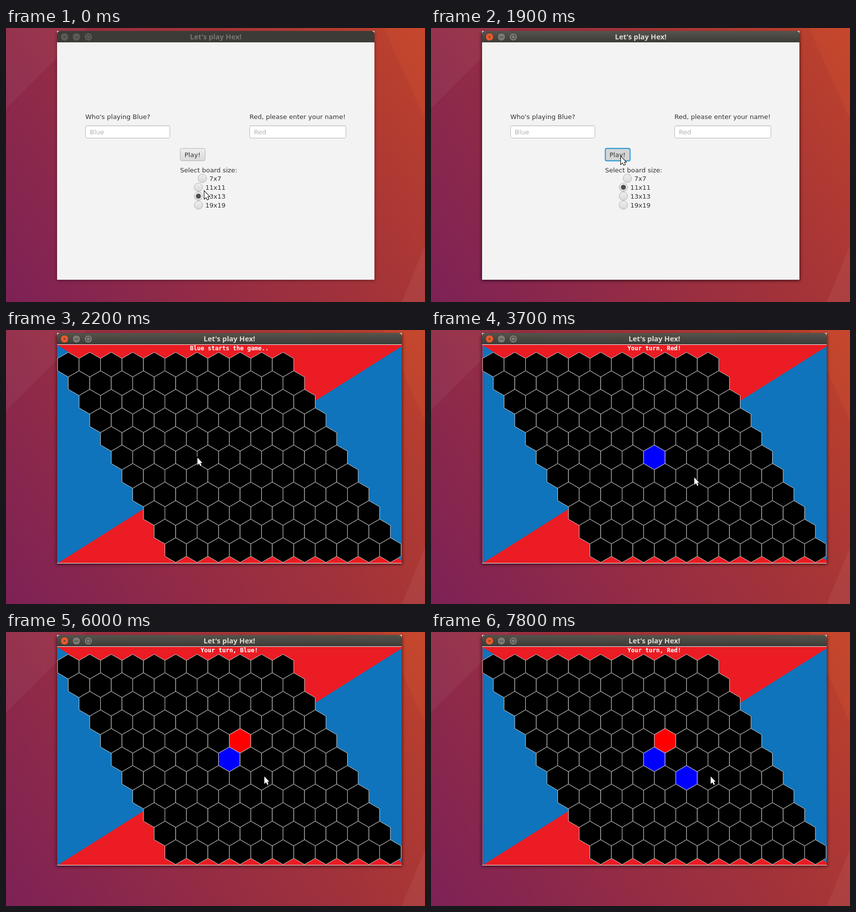
These frames come from a looping animation (845x554 px, 8 s). An HTML page:

```html
<!DOCTYPE html>
<html lang="en">
<head>
<meta charset="utf-8">
<title>Hex</title>
<style>
  html, body { margin: 0; width: 100%; height: 100%; overflow: hidden; }
  svg { display: block; width: 845px; height: 554px; }
  text { white-space: pre; }
  #menu text { font: 13px "DejaVu Sans", sans-serif; fill: #333; }
  #menu .hint { fill: #b0b0b0; }
  #title { font: bold 14.5px "Noto Sans", "Open Sans", sans-serif; text-anchor: middle; }
  #status { font: bold 12px "DejaVu Sans Mono", monospace; fill: #fff; text-anchor: middle; }
  #shadow { filter: blur(3px); }
</style>
</head>
<body>
<svg viewBox="0 0 845 554">
  <defs>
    <linearGradient id="wall" gradientUnits="userSpaceOnUse" x1="0" y1="554" x2="845" y2="0">
      <stop offset="0" stop-color="#7d2156"/>
      <stop offset=".36" stop-color="#942c44"/>
      <stop offset=".65" stop-color="#a53438"/>
      <stop offset="1" stop-color="#bf432b"/>
    </linearGradient>
    <linearGradient id="bar" x2="0" y2="1">
      <stop offset="0" stop-color="#56544c"/>
      <stop offset="1" stop-color="#3c3b37"/>
    </linearGradient>
    <linearGradient id="face" x2="0" y2="1">
      <stop offset="0" stop-color="#efefef"/>
      <stop offset="1" stop-color="#d9d9d9"/>
    </linearGradient>
    <linearGradient id="faceHover" x2="0" y2="1">
      <stop offset="0" stop-color="#f8f8f8"/>
      <stop offset="1" stop-color="#e6e6e6"/>
    </linearGradient>
    <linearGradient id="field" x2="0" y2="1">
      <stop offset="0" stop-color="#ececec"/>
      <stop offset=".14" stop-color="#fff"/>
    </linearGradient>
  </defs>

  <rect width="845" height="554" fill="url(#wall)"/>
  <path d="M0 0H163L0 163Z" fill="#fff" opacity=".045"/>
  <path d="M762 0H845V185Z" fill="#ff7030" opacity=".1"/>
  <path d="M845 440V554H798Z" fill="#fff" opacity=".05"/>

  <rect id="shadow" x="102" y="9"/>
  <rect id="body" x="103" y="6" fill="#f3f3f3"/>
  <path id="barShape"/>
  <g id="buttons" stroke="#3a3833"></g>
  <text id="title" y="23">Let's play Hex!</text>

  <g id="menu">
    <rect id="strip" x="743" y="29" width="55" height="443" fill="#f2f1ef"/>
    <text x="160" y="184">Who's playing Blue?</text>
    <text x="491" y="184">Red, please enter your name!</text>
    <g fill="url(#field)" stroke="#b9b9b9">
      <rect x="160.5" y="197.5" width="170" height="25" rx="3"/>
      <rect x="491.5" y="197.5" width="194" height="25" rx="3"/>
    </g>
    <text class="hint" x="169" y="215">Blue</text>
    <text class="hint" x="500" y="215">Red</text>
    <rect id="play" x="351.5" y="243.5" width="50" height="25" rx="3"/>
    <text x="360" y="261">Play!</text>
    <text x="351" y="292">Select board size:</text>
    <g id="radios"></g>
  </g>

  <g id="board">
    <path d="M103 29H798V472H103Z" fill="#eb1c23"/>
    <path d="M104 30.5L450 250V252.9L105 471H104ZM798 33L450 252.9V248L798 466Z" fill="#0f74bb"/>
    <path d="M103 29.5H798M103 471.5H798" stroke="#f0f0f0"/>
    <g id="cells" stroke="#d0d0d0"></g>
    <text id="status" x="450.4" y="41"></text>
  </g>

  <path id="cursor" d="M0 0V15L3.5 12L6 17L8.4 16L6.1 10.8H10Z"
        fill="#fff" stroke="#000" stroke-width="2" paint-order="stroke"/>
</svg>
<script>
const $ = id => document.getElementById(id);
const set = (el, attrs) => { for (const k in attrs) el.setAttribute(k, attrs[k]); };
const add = (parent, tag, attrs, text = '') => {
  const el = parent.appendChild(document.createElementNS('http://www.w3.org/2000/svg', tag));
  set(el, attrs);
  el.textContent = text;
  return el;
};
const show = (el, on) => el.style.display = on ? '' : 'none';

// Title bar buttons
const knobs = [0, 1, 2].map(i => add($('buttons'), 'circle', { cx: 118 + 24 * i, cy: 18, r: 8 }));
const glyphs = add($('buttons'), 'path', {
  d: 'M116 16l4 4m0 -4l-4 4M138 18.5h8M162.5 14.5h7v7h-7Z', fill: 'none'
});

// Board size options, centred under their heading
const radios = [7, 11, 13, 19].map((n, i) => {
  const cx = n < 10 ? 396 : 388, cy = 304 + 18 * i, g = $('radios');
  const ring = add(g, 'circle', { cx, cy, r: 8.5 });
  const dot = add(g, 'circle', { cx, cy, r: 5, fill: '#4e4e4e' });
  add(g, 'text', { x: cx + 14, y: cy + 5 }, `${n}x${n}`);
  return { ring, dot };
});

// Hexagonal cells
const R = 25, HALF = R * Math.sqrt(3) / 2, SIZE = 11;
const cells = [];
for (let row = 0; row < SIZE; row++)
  for (let col = 0; col < SIZE; col++) {
    const x = 104 + HALF * (1 + row + 2 * col), y = 70 + 1.5 * R * row;
    cells.push(add($('cells'), 'path', {
      d: `M${x} ${y - R}l${HALF} ${R / 2}v${R}l${-HALF} ${R / 2}l${-HALF} ${-R / 2}v${-R}Z`
    }));
  }

const HOVER = 400, SELECT = 1100, PRESS = 1900, RESIZE = 2100, PLAY = 2200;

const moves = [
  { at: 3100, row: 5, col: 5, fill: '#00f' },
  { at: 5700, row: 4, col: 6, fill: '#f00' },
  { at: 6600, row: 6, col: 6, fill: '#00f' }
];

// Pointer glides: start, end, destination; it rests in between
const glides = [
  [300, HOVER, 395, 328], [1800, PRESS, 383, 260], [RESIZE, PLAY, 386, 258],
  [PLAY, 2900, 441, 252], [3100, 3700, 531, 298], [3700, 3900, 526, 308],
  [4300, 4700, 515, 328], [4700, 5100, 498, 256], [5200, 5300, 486, 230],
  [5700, 6000, 521, 292], [6000, 6400, 529, 300], [6600, 6700, 536, 372],
  [6800, 7300, 569, 232], [7300, 7700, 560, 300], [7700, 7800, 564, 292]
];

function pointer(t) {
  let x = 400, y = 330;
  for (const [start, end, toX, toY] of glides) {
    const p = Math.min(1, Math.max(0, (t - start) / (end - start)));
    const ease = p * p * (3 - 2 * p);
    x += (toX - x) * ease;
    y += (toY - y) * ease;
  }
  return [Math.round(x), Math.round(y)];
}

function drawWindow(t) {
  const active = t >= SELECT, wide = t >= RESIZE;
  const w = wide ? 695 : 640, bottom = wide ? 472 : 509;
  set($('body'), { width: w, height: bottom - 6 });
  set($('shadow'), { width: w + 2, height: bottom - 7, opacity: active ? .6 : .3 });
  set($('barShape'), {
    d: `M103 29V12q0 -6 6 -6h${w - 12}q6 0 6 6V29Z`,
    fill: active ? 'url(#bar)' : '#3c3b37'
  });
  set($('title'), { x: 103 + w / 2, fill: active ? '#dfdbd2' : '#79766f' });
  knobs.forEach((k, i) => set(k, { fill: !active ? '#5c5a54' : i ? '#7b7972' : '#e7592e' }));
  show($('strip'), wide);
}

function drawMenu(t) {
  const picked = t < SELECT ? 2 : 1, pressed = t >= PRESS;
  const outline = focus => ({ stroke: focus ? '#1a93d0' : '#b3b3b3', 'stroke-width': focus ? 1.8 : 1 });
  radios.forEach(({ ring, dot }, i) => {
    const hover = i === 1 && t >= HOVER && !pressed;
    set(ring, { fill: hover ? 'url(#faceHover)' : 'url(#face)', ...outline(hover && t >= SELECT) });
    show(dot, i === picked);
  });
  set($('play'), { fill: pressed ? '#d3d5d6' : 'url(#face)', ...outline(pressed) });
}

function drawBoard(t) {
  const done = moves.filter(m => m.at <= t);
  cells.forEach(c => set(c, { fill: '#000' }));
  done.forEach(({ row, col, fill }) => set(cells[row * SIZE + col], { fill }));
  $('status').textContent = !done.length ? 'Blue starts the game..'
    : `Your turn, ${done.length % 2 ? 'Red' : 'Blue'}!`;
}

function draw(now) {
  const t = Math.floor(now % 8000 / 100) * 100, playing = t >= PLAY;
  drawWindow(t);
  show($('menu'), !playing);
  show($('board'), playing);
  playing ? drawBoard(t) : drawMenu(t);
  set($('cursor'), { transform: `translate(${pointer(t)})` });
}

const start = performance.now();
(function tick() {
  draw(performance.now() - start);
  requestAnimationFrame(tick);
})();
</script>
</body>
</html>
```
